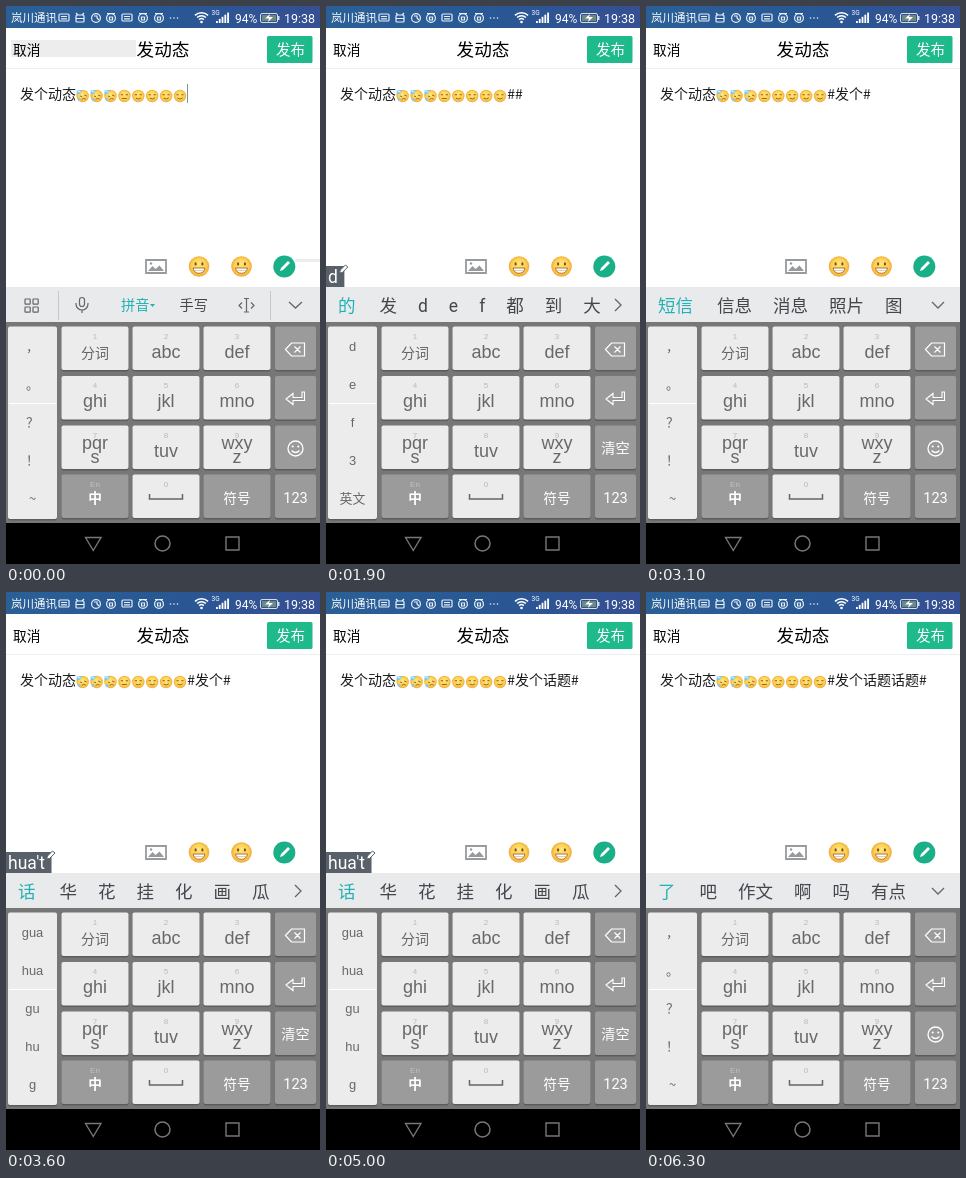
Recreate the animation shown at these times as an HTML page with a canvas. Size 314 by 558 pixels, loop 6400 ms.

```html
<!DOCTYPE html>
<html lang="zh-CN">
<head>
<meta charset="utf-8">
<style>
html, body { margin: 0; width: 100%; height: 100%; overflow: hidden; background: #fff; }
canvas { display: block; width: 314px; height: 558px; }
</style>
</head>
<body>
<canvas id="stage" width="314" height="558"></canvas>
<script>
const ctx = document.getElementById('stage').getContext('2d');
const LOOP = 6400;
const CJK = '"Noto Sans CJK SC", "Noto Sans CJK", sans-serif';
const ARIAL = '"Liberation Sans", "Noto Sans CJK SC", sans-serif';
const ROBOTO = 'Roboto, "Noto Sans CJK SC", sans-serif';
const TEAL = '#22b2b5', GREEN = '#1fba8c', INK = '#43474c';

// Input state from each time on: committed text, pinyin being typed, suggestions
const NEXT = ['短信 信息 消息 照片 图', '的 了 吧 是 吗 啊', '了 吧 作文 啊 吗 有点'];
const STEPS = [
  [0, ''], [1300, '##'],
  [1900, '##', 'd'], [2000, '##', 'fa'], [2200, '##', "fa'g"], [2300, '##', "fa'ge"],
  [2700, '#发个#', '', NEXT[0]],
  [3200, '#发个#', 'g'], [3300, '#发个#', 'hu'], [3500, '#发个#', 'hua'],
  [3600, '#发个#', "hua't"], [3700, '#发个#', "hua'ti"],
  [3800, '#发个话题#', '', NEXT[1]], [4200, '#发个话题#'],
  [4600, '#发个话题#', 'g'], [4700, '#发个话题#', 'hu'], [4800, '#发个话题#', 'hua'],
  [4900, '#发个话题#', "hua't"], [5100, '#发个话题#', "hua'ti"],
  [5300, '#发个话题话题#', '', NEXT[2]]
];
// pinyin: [candidates, side list]
const PINYIN = {
  "d": ['的 发 d e f 都 到 大', 'd e f 3 英文'],
  "fa": ['发 大 打 法 达 答 罚', 'fa da e f 英文'],
  "fa'g": ['发给 大概 发 大 打 法', 'fa da e f d'],
  "fa'ge": ['发个 大哥 打个 发 大', 'fa da e f d'],
  "g": ['个 给 g h i 和 好 过', 'g h i 4 英文'],
  "hu": ['会 股 故 古 护 湖 胡', 'gu hu g h 英文'],
  "hua": ['话 华 花 挂 化 画 瓜', 'gua hua gu hu g'],
  "hua't": ['话 华 花 挂 化 画 瓜', 'gua hua gu hu g'],
  "hua'ti": ['话题 滑梯 话 华 花', 'gua hua gu hu g']
};
const SYMBOLS = '， 。 ？ ！ ~';
const CARET_ON = [[0, 500], [700, 900], [1300, 1500], [1700, 1900], [2100, 2500], [2700, 2900],
  [3300, 3500], [3800, 4000], [4200, 4400], [4600, 4800], [5300, 5500], [5700, 5900], [6100, 6300]];

function text(s, x, y, size, color, family = CJK, align = 'left', weight = 400) {
  ctx.font = `${weight} ${size}px ${family}`;
  ctx.fillStyle = color;
  ctx.textAlign = align;
  ctx.fillText(s, x, y);
}
function rect(x, y, w, h, color) {
  ctx.fillStyle = color;
  ctx.fillRect(x, y, w, h);
}
function box(x, y, w, h, r, color) {
  ctx.beginPath();
  ctx.roundRect(x, y, w, h, r);
  ctx.fillStyle = color;
  ctx.fill();
}
function frame(x, y, w, h, r, color, width = 1) {
  ctx.beginPath();
  ctx.roundRect(x, y, w, h, r);
  ctx.strokeStyle = color;
  ctx.lineWidth = width;
  ctx.stroke();
}
function disc(x, y, r, color) {
  ctx.beginPath();
  ctx.arc(x, y, r, 0, 7);
  ctx.fillStyle = color;
  ctx.fill();
}
function path(d, color, width) {
  const p = new Path2D(d);
  if (width) {
    ctx.strokeStyle = color;
    ctx.lineWidth = width;
    ctx.stroke(p);
  } else {
    ctx.fillStyle = color;
    ctx.fill(p);
  }
}
function at(x, y, draw) {
  ctx.save();
  ctx.translate(x, y);
  draw();
  ctx.restore();
}

function statusBar() {
  const g = ctx.createLinearGradient(0, 0, 314, 0);
  g.addColorStop(0, '#2b6097');
  g.addColorStop(.5, '#285894');
  g.addColorStop(1, '#364f92');
  rect(0, 0, 314, 22, g);
  text('岚川通讯', 5, 16, 11.5, '#fff', CJK, 'left', 500);
  const c = '#e6eef8';
  [58, 121].forEach(x => {
    frame(x - 5, 8, 10, 7, 1, c, 1.2);
    path(`M${x - 3} 10.5h6M${x - 3} 12.8h6`, c, 1.2);
  });
  frame(70, 9, 8, 7, 1, c, 1.2);
  path('M70 7l2 2M78 7l-2 2M70 12.5h8', c, 1.2);
  [90, 105, 137, 153].forEach((x, i) => {
    frame(x - 4.4, 7.6, 8.8, 8.8, 4.4, c, 1.2);
    path(i ? `M${x - 4} 7.5h8M${x - 1.5} 11h3v3h-3z` : `M${x - 2} 10h3v2l2 2`, c, 1.2);
  });
  [164.5, 168, 171.5].forEach(x => disc(x, 12, .8, c));
  [9.3, 6.3, 3.3].forEach(r => {
    ctx.beginPath();
    ctx.arc(195.5, 16, r, -2.35, -.79);
    ctx.strokeStyle = '#fff';
    ctx.lineWidth = 1.5;
    ctx.stroke();
  });
  disc(195.5, 16, 1.3, '#fff');
  text('3G', 205.5, 9, 6.5, '#fff', ROBOTO);
  for (let i = 0; i < 5; i++) rect(210 + i * 2.8, 15 - i * 2.1, 1.8, 2 + i * 2.1, '#fff');
  text('94%', 229, 16.5, 12, '#fff', ROBOTO);
  frame(254.5, 7.5, 17, 9, 1.5, '#d5dde0');
  rect(256, 9, 14, 6, '#6c8a80');
  rect(272, 10, 1.5, 4, '#d5dde0');
  path('M264 8l-5 4.5h4l-1 3.5 5-5h-4z', '#fff');
  text('19:38', 278, 16.5, 12.5, '#fff', ROBOTO);
}

function header(t) {
  if (t < 100) rect(5, 34, 125, 17, '#ededed');
  text('取消', 7, 49, 13.7, '#000');
  text('发动态', 157, 50, 17.6, '#000', CJK, 'center');
  box(261, 30, 45.5, 27, 1.5, GREEN);
  text('发布', 284.5, 49, 14.5, '#fff', CJK, 'center');
  rect(0, 62, 314, 1, '#eee');
}

function face(r) {
  const g = ctx.createRadialGradient(0, -r * .3, 0, 0, 0, r);
  g.addColorStop(0, '#ffe680');
  g.addColorStop(.7, '#fdd04f');
  g.addColorStop(1, '#efa93c');
  disc(0, 0, r, g);
}
function smallFace(i) {
  at(76.7 + i * 13.9, 90, () => {
    face(6.2);
    const ink = '#8a5a22';
    if (i < 3) {
      path('M-6 -5.5L0 -6 -2.5 -2.5 -6 -1.5Z', '#7cc8ea');
      path('M-5 -4.5l3 .5', '#e2f6ff', 1);
      path('M-2.5 0l2 .8M1.5 -1l2.5 1M-1 3.5q2 -2 4 -.5', ink, .9);
      disc(-3.4, 3.5, 1.4, '#86cdea');
    } else {
      path('M-3.5 -1.3h2.2M1.3 -1.3h2.2', ink, 1.1);
      path(i === 3 ? 'M-2.5 2.5h5' : 'M-2.5 2.2q3 1.8 5.2 -.4', ink, .9);
    }
  });
}
function grin(x) {
  at(x, 260.5, () => {
    face(10.3);
    ctx.beginPath();
    ctx.ellipse(-3.4, -2.6, 1.1, 1.7, 0, 0, 7);
    ctx.ellipse(3.4, -2.6, 1.1, 1.7, 0, 0, 7);
    ctx.fillStyle = '#7a4f20';
    ctx.fill();
    const mouth = 'M-6 1.5H6Q5 6.8 0 6.8T-6 1.5Z';
    path(mouth, '#fff');
    path(mouth, '#a8682c', .9);
    path('M-5 4H5', '#d9b48c', .7);
  });
}

function editor(t, typed) {
  text('发个动态', 14, 93, 14, '#1a1a1a');
  for (let i = 0; i < 8; i++) smallFace(i);
  text(typed, 181.3, 93, 14, '#1a1a1a');
  if (CARET_ON.some(([a, b]) => t >= a && t < b)) {
    const before = ctx.measureText(typed.slice(0, -1)).width;
    rect(Math.round(181 + before), 78, 1, 19, '#6f9c98');
  }
  if (t < 100) rect(289, 253, 25, 3, '#ececec');
  frame(140, 254, 20, 13, 0, '#989b9e', 1.8);
  path('M142 265l4.5-5 3 3 4-3.500 4.500 5.500z', '#989b9e');
  disc(145, 257.5, 1.2, '#989b9e');
  grin(193);
  grin(235.5);
  disc(278.3, 260.5, 11, '#1aaf87');
  path('M274 265l1-3 7-7 2 2-7 7z', '#fff');
}

function layoutBar(cands, typing) {
  rect(0, 281, 314, 35, '#e9eaec');
  const c = '#62676c';
  if (!cands) {
    [[19, 293], [27, 293], [19, 301], [27, 301]].forEach(([x, y]) => frame(x, y, 5.2, 5.2, .5, c, 1.2));
    rect(52, 285, 1, 29, '#c5c8cb');
    frame(73.5, 291.5, 5, 9, 2.5, c, 1.2);
    path('M70 297v1a6 6 0 0 0 12 0v-1M76 304v3', c, 1.2);
    text('拼音', 115, 304, 14.2, TEAL);
    path('M144 298h5l-2.5 3z', TEAL);
    text('手写', 173.5, 304, 14.2, INK);
    path('M238 292.5h5M238 306h5M240.5 292.5v13.5M236 296.5l-3 3 3 3M245 296.5l3 3-3 3', c, 1.2);
    rect(264, 285, 1, 29, '#c5c8cb');
    path('M283 296l6.5 6 6.5-6', c, 1.3);
    return;
  }
  let x = 12;
  cands.split(' ').forEach((w, i) => {
    text(w, x, 305.5, 17.5, i ? INK : TEAL, ROBOTO);
    x += ctx.measureText(w).width + (i ? 21 : 24);
  });
  path(typing ? 'M289 293l6 6-6 6' : 'M286 296l6 6 6-6', c, 1.3);
}

function bubble(s) {
  ctx.font = `17.5px ${ROBOTO}`;
  const w = ctx.measureText(s).width + 8.5;
  rect(0, 260, w, 21, '#596069');
  text(s, 2, 276.5, 17.5, '#fff', ROBOTO);
  const pen = `M${w - 5} 267l1-3 5-5 2.5 2-5.5 5.5z`;
  path(pen, '#fff');
  path(pen, '#596069', 1);
}

const KEYS = ['分词', 'abc', 'def', 'ghi', 'jkl', 'mno', 'pqr s', 'tuv', 'wxy z', '中', '', '符号'];
const COL = [55.5, 126.5, 197.5], ROW = [320.5, 370, 419.5, 468.5];

function key(x, y, w, h, dark) {
  box(x, y + 1.5, w, h, 2, '#5c5c5c');
  box(x, y, w, h, 2, dark ? '#9b9b9b' : '#ececec');
}

function keyboard(side, typing) {
  rect(0, 316, 314, 201, '#777');
  key(2, 320.5, 49, 192.5);
  rect(3, 397, 47, 1, '#fff');
  side.split(' ').forEach((s, i) =>
    text(s, 26.5, 344.5 + i * 38.2, 12.9, '#686868', typing ? ARIAL : CJK, 'center'));

  KEYS.forEach((label, i) => {
    const x = COL[i % 3], y = ROW[i / 3 | 0], mid = x + 33.5;
    const dark = i === 9 || i === 11;
    key(x, y, 67, 43.5, dark);
    const hint = i < 9 ? i + 1 : i === 9 ? 'En' : i === 10 ? 0 : '';
    text(hint, mid, y + 12, 8, dark ? '#c2c2c2' : '#b9b9b9', ARIAL, 'center');
    if (dark) text(label, mid, y + 28, 13.7, '#fff', CJK, 'center', i === 9 ? 700 : 400);
    else if (!i) text(label, mid, y + 31, 14, '#666', CJK, 'center');
    else {
      const [a, b] = label.split(' ');
      text(a, mid, y + (b ? 23 : 31), 18, '#686868', ARIAL, 'center');
      if (b) text(b, mid, y + 37.5, 18, '#686868', ARIAL, 'center');
    }
  });
  path('M143.5 488v5h33v-5', '#666', 1.5);

  ROW.forEach(y => key(269, y, 41, 43.5, true));
  const w = '#fff';
  path('M279.5 343.5l6-6.5h13v13h-13zM288.5 340.5l6 6M294.5 340.5l-6 6', w, 1.2);
  path('M298.5 386v8.5h-11.500v4l-7-5.500 7-5.500v4h9v-5.500z', w, 1.1);
  if (typing) text('清空', 289.5, 447, 14.2, w, CJK, 'center');
  else {
    frame(282, 435, 15, 15, 7.5, w, 1.3);
    disc(286.7, 440.5, 1.1, w);
    disc(292.3, 440.5, 1.1, w);
    path('M285.5 444.5q4 4 8 0', w, 1.2);
  }
  text('123', 289.5, 496.5, 14.5, w, ROBOTO, 'center');
}

function navBar() {
  rect(0, 517, 314, 41, '#000');
  const c = '#777';
  path('M79.5 531.5h15.5l-7.75 13z', c, 1.4);
  frame(149, 530, 15, 15, 7.5, c, 1.5);
  frame(220, 531, 13, 13, 0, c, 1.4);
}

function draw(t) {
  const [, typed, pinyin, next] = STEPS.findLast(s => s[0] <= t);
  const [cands, side] = pinyin ? PINYIN[pinyin] : [next, SYMBOLS];
  rect(0, 0, 314, 558, '#fff');
  statusBar();
  header(t);
  editor(t, typed);
  layoutBar(cands, pinyin);
  if (pinyin) bubble(pinyin);
  keyboard(side, pinyin);
  navBar();
}

const start = performance.now();
function tick() {
  draw((performance.now() - start) % LOOP);
  requestAnimationFrame(tick);
}
tick();
</script>
</body>
</html>
```
